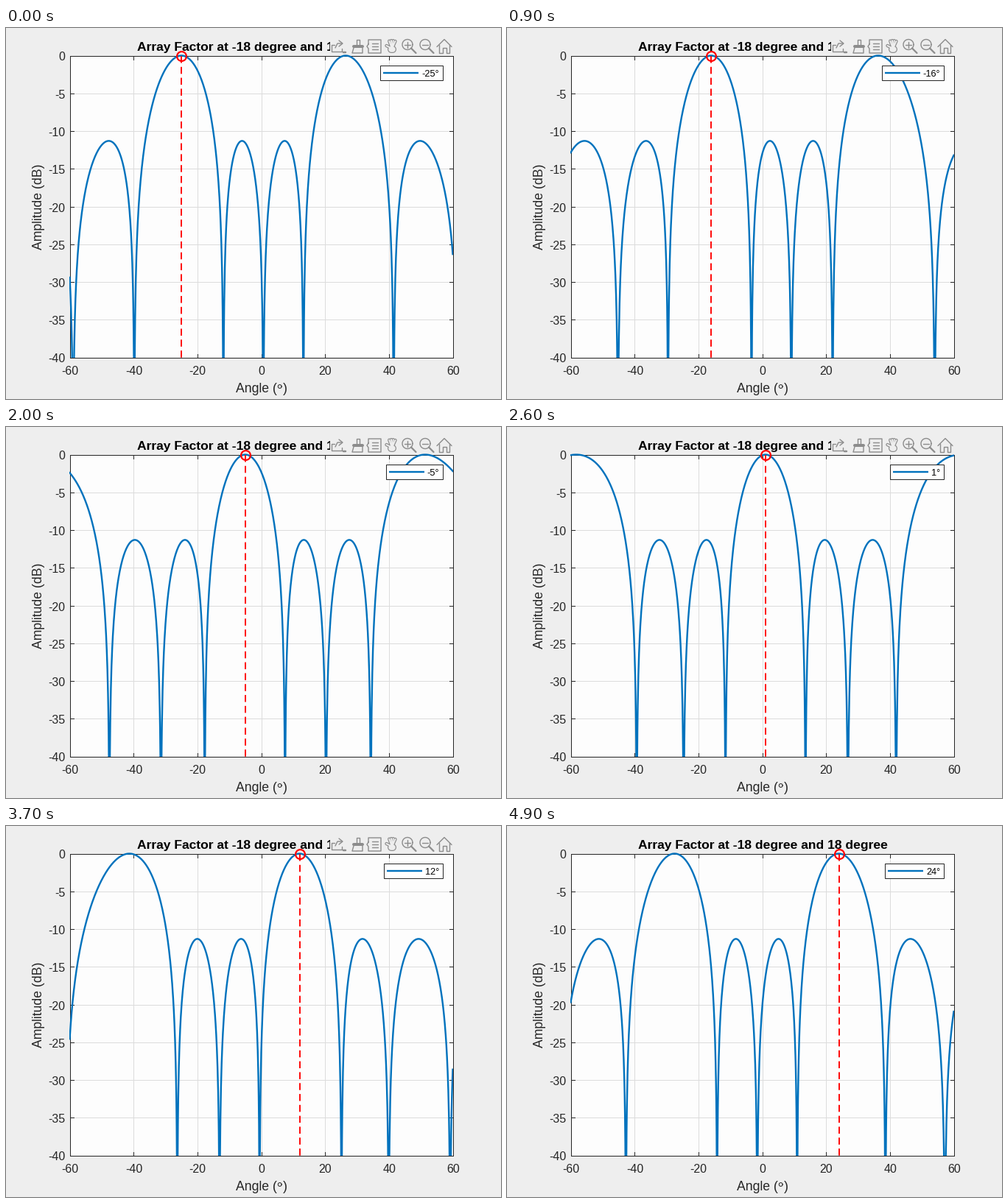
A matplotlib script that plays this animation: 672 px wide and 504 px high, repeating every 5000 ms.

```python
import numpy as np
import matplotlib.pyplot as plt
from matplotlib.animation import FuncAnimation
from matplotlib.patches import Rectangle

plt.rcParams["font.family"] = "Liberation Sans"
WIDTH, HEIGHT, DPI = 672, 504, 100
FRAMES, INTERVAL = 50, 100
PT = 72 / DPI  # points per pixel
X0, Y0, PLOT_W, PLOT_H = 86.5, 37.5, 520, 410
X1, Y1 = X0 + PLOT_W, Y0 + PLOT_H
DARK, GRID, GRAY, PAPER = "#262626", "#dcdcdc", "#8c8c8c", "#eeeeee"
BLUE, RED = "#0072bd", "#ff0000"
ELEMENTS, SPACING = 4, 1.152  # spacing in wavelengths
START_ANGLE, TOOLBAR_END = -25, 46
TICK, LEGEND_FONT, LEGEND_RIGHT, LEGEND_TOP = 5, 12.8, 592.5, 50.5

fig = plt.figure(figsize=(WIDTH / DPI, HEIGHT / DPI), dpi=DPI, facecolor=PAPER)
ax = fig.add_axes([0, 0, 1, 1])
ax.set_xlim(0, WIDTH)
ax.set_ylim(HEIGHT, 0)
ax.axis("off")


def px(angle):
    return X0 + (angle + 60) / 120 * PLOT_W


def py(db):
    return Y0 - db / 40 * PLOT_H


def line(xs, ys, color=DARK, width=1.0, z=2, **kw):
    return ax.plot(xs, ys, color=color, lw=width * PT, zorder=z, **kw)[0]


def label(x, y, s, size, color=DARK, z=2, **kw):
    return ax.text(x, y, s, fontsize=size * PT, color=color, zorder=z,
                   va="baseline", **kw)


def box(x, y, w, h, face, edge="none", z=0):
    return ax.add_patch(Rectangle((x, y), w, h, fc=face, ec=edge, lw=PT, zorder=z))


def circle(x, y, radius):
    turn = np.linspace(0, 2 * np.pi, 40)
    return x + radius * np.cos(turn), y + radius * np.sin(turn)


def array_factor_db(angles, steer):
    """Level of a uniform line array, as the mean of its element phasors."""
    shift = np.sin(np.radians(angles)) - np.sin(np.radians(steer))
    phase = 2 * np.pi * SPACING * shift
    total = sum(np.exp(1j * k * phase) for k in range(ELEMENTS))
    return 20 * np.log10(np.maximum(np.abs(total) / ELEMENTS, 1e-4))


def draw_axes():
    box(X0, Y0, PLOT_W, PLOT_H, "#fdfdfd")
    for angle in range(-60, 61, 20):
        x = px(angle)
        line([x, x], [Y0, Y1], GRID, z=1)
        for edge, inward in ((Y0, TICK), (Y1, -TICK)):
            line([x, x], [edge, edge + inward])
        label(x + 0.3, 471, str(angle), 16, ha="center")
    for db in range(-40, 1, 5):
        y = py(db)
        line([X0, X1], [y, y], GRID, z=1)
        for edge, inward in ((X0, TICK), (X1, -TICK)):
            line([edge, edge + inward], [y, y])
        label(80.5, y + 7, str(db), 16, ha="right")
    box(X0, Y0, PLOT_W, PLOT_H, "none", DARK, 2)

    label(347.3, 31, "Array Factor at -18 degree and 18 degree", 17.5, "black",
          ha="center", weight="bold")
    label(312, 495, "Angle (", 17.6)
    line(*circle(371.7, 487, 2.4))
    label(382.3, 495, ")", 17.6, ha="right")
    label(49, 242.3, "Amplitude (dB)", 17.6, rotation=90, ha="center",
          rotation_mode="anchor")


def draw_toolbar():
    """Icons sit at an even pitch; their strokes are relative to the centre."""
    pitch, first, middle = 24, 451, 25
    parts = [box(440, 13, 168, 22.5, PAPER, z=7)]

    def stroke(slot, points, width=1.4, color=GRAY, **kw):
        xs, ys = np.transpose(points)
        parts.append(line(first + pitch * slot + xs, middle + ys, color, width, 8, **kw))

    def export(slot):
        stroke(slot, [(-5, -2), (-9, -2), (-9, 7), (5, 7), (5, 3)])
        stroke(slot, [(-4, 2), (-1, -4), (5, -4)])
        stroke(slot, [(1, -8), (6, -4), (1, 0)])
        stroke(slot, [(7, 8), (10, 8)], 2.5)

    def brush(slot):
        stroke(slot, [(1, -2), (1, -9), (5, -9), (5, -2)])
        stroke(slot, [(-3, 0), (9, 0)], 4)
        stroke(slot, [(-3, 2), (-5, 9), (9, 9), (9, 2)])

    def data_tip(slot):
        stroke(slot, [(-7, -3), (-7, -9), (10, -9), (10, 9), (-7, 9), (-7, 3),
                      (-9, 0), (-7, -3)])
        for y in (-4, 0, 4):
            stroke(slot, [(-2, y), (6, y)])

    def hand(slot):
        fingers = [(np.radians(a), 11) for a in np.linspace(-20, 24, 4)]
        fingers.append((np.radians(-62), 8.5))
        for color, inset in ((GRAY, 0), (PAPER, 2.4)):
            for angle, reach in fingers:
                tip = (1 + reach * np.sin(angle), 3 - reach * np.cos(angle))
                stroke(slot, [(1, 3), tip], 4.4 - inset, color)
            stroke(slot, [(0, 4), (2, 4)], 10 - inset, color)

    def magnifier(slot, plus):
        stroke(slot, np.transpose(circle(-2, -2.5, 7)))
        stroke(slot, [(3, 2.5), (9.5, 9)], 2.2)
        stroke(slot, [(-6, -2.5), (2, -2.5)])
        if plus:
            stroke(slot, [(-2, -6.5), (-2, 1.5)])

    def home(slot):
        stroke(slot, [(-10, 0.5), (0, -9.5), (10, 0.5)])
        for side in (-1, 1):
            stroke(slot, [(7 * side, -2), (7 * side, 9), (2.5 * side, 9),
                          (2.5 * side, 2), (0, 2)])

    export(0)
    brush(1)
    data_tip(2)
    hand(3)
    magnifier(4, plus=True)
    magnifier(5, plus=False)
    home(6)
    for part in parts[1:]:
        part.set_solid_capstyle("round")
    return parts


draw_axes()
toolbar = draw_toolbar()

angles = np.linspace(-60, 60, 1201)
curve = line([], [], BLUE, 2.4, 3, solid_joinstyle="round")
curve.set_clip_path(Rectangle((X0 - 0.5, Y0 - 1.5), PLOT_W + 1, PLOT_H + 1.5,
                              transform=ax.transData))
pointer = line([], [], RED, 1.9, 4, ls=(0, (5, 2.8)), dash_capstyle="butt")
marker = line([], [], RED, z=5, marker="o", ms=12.8 * PT, mfc="none",
              mew=2.2 * PT)
legend_box = box(0, 0, 0, 0, "white", DARK, 6)
legend_line = line([], [], BLUE, 2.4, 6.5, solid_capstyle="butt")
legend_text = label(LEGEND_RIGHT - 4.4, LEGEND_TOP + 15.5, "", LEGEND_FONT,
                    "black", 7, ha="right")


def update(frame):
    steer = START_ANGLE + frame
    x = px(steer)
    curve.set_data(px(angles), py(array_factor_db(angles, steer)))
    pointer.set_data([x, x], [Y0, Y1])
    marker.set_data([x], [Y0])

    legend_text.set_text(f"{steer}°")
    text_width = legend_text.get_window_extent().width
    left = LEGEND_RIGHT - 60.4 - text_width
    legend_box.set_bounds(left, LEGEND_TOP, LEGEND_RIGHT - left, 20)
    legend_line.set_data([left + 4, left + 52], [LEGEND_TOP + 10.5] * 2)

    for part in toolbar:
        part.set_visible(frame < TOOLBAR_END)
    return []


anim = FuncAnimation(fig, update, frames=FRAMES, interval=INTERVAL,
                     repeat=True, repeat_delay=0, blit=False)
plt.show()
```
